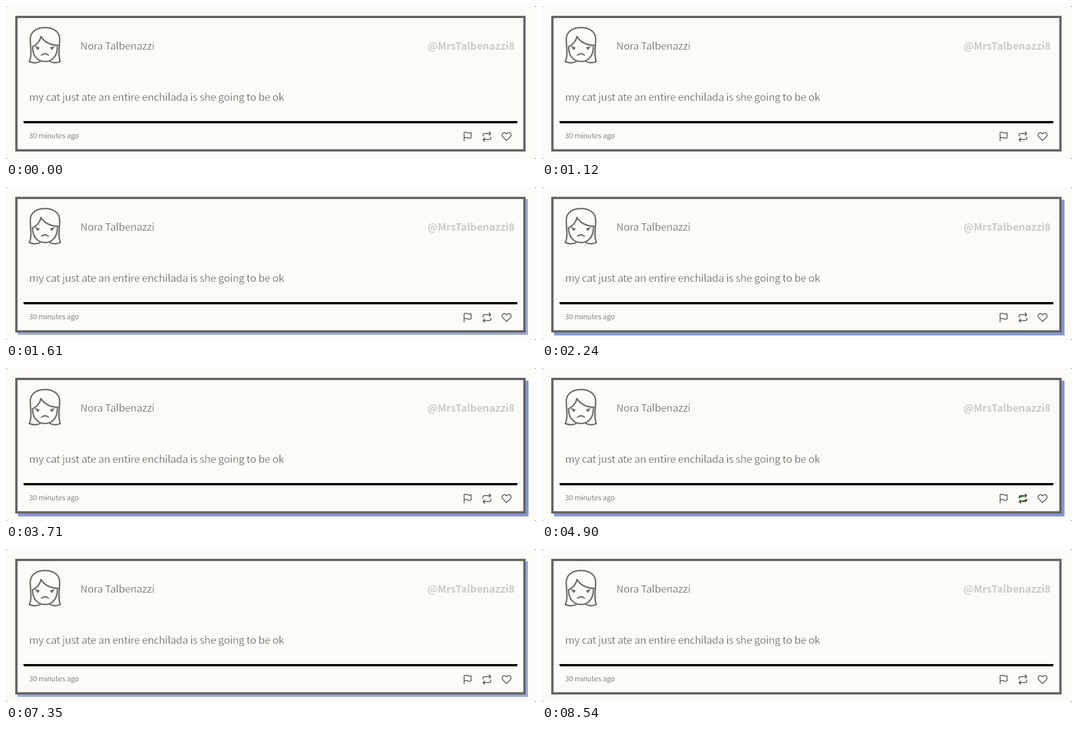
An HTML page for the animation above (8820 ms loop, 918 px wide and 266 px high).

```html
<!DOCTYPE html>
<html lang="en">
<head>
<meta charset="utf-8">
<title>Post card</title>
<style>
  :root { --paper: #fcfbf8; --ink: #666663; }
  html, body { margin: 0; width: 100%; height: 100%; overflow: hidden; background: #555; }
  svg { display: block; width: 918px; height: 266px; background: var(--paper); border-radius: 3px; }
  text {
    font: 400 17.9px "Noto Sans CJK JP", "Noto Sans CJK SC", "Noto Sans CJK", "Open Sans", sans-serif;
    letter-spacing: -.0145em;
    fill: #5f5f5d;
    /* a thin paper-coloured outline makes the strokes lighter */
    stroke: var(--paper);
    stroke-width: .4px;
  }
  .handle { font-size: 17.6px; font-weight: 700; letter-spacing: 0; fill: #cbcac8; stroke: none; }
  .time { font-size: 12.55px; stroke-width: .25px; }
  .line { fill: none; stroke-linecap: round; stroke-linejoin: round; }
  .avatar { stroke: #716d6a; stroke-width: 2.5; }
  .icon { stroke: #555553; stroke-width: 2; }
</style>
</head>
<body>
<svg viewBox="0 0 918 266">
  <rect id="shadow" x="16" y="17" width="884" height="236" fill="#8795d6"/>
  <rect x="18" y="19" width="880" height="232" fill="#fcfbf8" stroke="#666663" stroke-width="4"/>

  <g class="line avatar">
    <path d="M40.5 96.5C45.5 86 42 72 42 58C42 44.5 53 37.5 67.5 37.5S93 44.5 93 58C93 72 89.5 86 94 96.5"/>
    <path d="M40.5 96.5Q50 101 59 96.5M94 96.5Q85 101 76 96.5"/>
    <path d="M46 71C46 87 55 96.5 67.5 96.5S89 87 89 71"/>
    <path d="M46 71C53 67.500 59 61 60.500 53C66 62 76 68 91 68.500"/>
    <path d="M61.500 85.500Q67.500 80.500 73.500 85.500" stroke-width="2.200"/>
    <path d="M51.500 71L57 73M83 71L77.500 73" stroke-width="2"/>
    <g fill="#716d6a" stroke="none">
      <circle cx="55" cy="73.500" r="2.400"/>
      <circle cx="79.500" cy="73.500" r="2.400"/>
    </g>
  </g>

  <text x="128.500" y="76">Nora Talbenazzi</text>
  <text class="handle" x="881" y="76" text-anchor="end">@MrsTalbenazzi8</text>
  <text x="40" y="165">my cat just ate an entire enchilada is she going to be ok</text>
  <path d="M30 200H886L885 204H31Z"/>
  <text class="time" x="40" y="230">30 minutes ago</text>

  <g class="line icon">
    <path transform="translate(790.500 218) scale(.75)"
      d="M4 15s1-1 4-1 5 2 8 2 4-1 4-1V3s-1 1-4 1-5-2-8-2-4 1-4 1zM4 22V15"/>
    <path id="repeat" transform="translate(824 218) scale(.75)"
      d="M17 1l4 4-4 4M3 11V9a4 4 0 0 1 4-4h14M7 23l-4-4 4-4M21 13v2a4 4 0 0 1-4 4H3"/>
    <path id="heart" transform="translate(858 218) scale(.75)"
      d="M20.840 4.610a5.500 5.500 0 0 0-7.780 0L12 5.670l-1.060-1.060a5.500 5.500 0 0 0-7.780 7.780L12 21.230l8.840-8.840a5.500 5.500 0 0 0 0-7.780z"/>
  </g>
</svg>
<script>
  const LOOP = 8820, TICK = 70;
  const FADE = 200, ENTER = 1510, LEAVE = 7320, OFFSET = 5;
  const hovers = [
    { id: 'repeat', from: 4060, to: 5180, color: '#3f7a3c' },
    { id: 'heart', from: 5250, to: 7350, color: '#fa470a' }
  ];
  const el = id => document.getElementById(id);
  const clamp = v => Math.min(1, Math.max(0, v));
  const bezier = (a, b, u) => 3 * a * u * (1 - u) ** 2 + 3 * b * u * u * (1 - u) + u ** 3;

  // CSS "ease": solve x(u) = v by bisection, then read y(u)
  function ease(v) {
    if (v <= 0 || v >= 1) return clamp(v);
    let low = 0, high = 1;
    for (let i = 0; i < 20; i++) {
      const mid = (low + high) / 2;
      if (bezier(.25, .25, mid) < v) low = mid; else high = mid;
    }
    return bezier(.1, 1, low);
  }

  function draw(t) {
    const p = ease((t - ENTER) / FADE) - ease((t - LEAVE) / FADE);
    const d = OFFSET * p;
    el('shadow').setAttribute('transform', `translate(${d} ${d})`);
    el('shadow').setAttribute('opacity', p);
    for (const { id, from, to, color } of hovers)
      el(id).setAttribute('fill', t >= from && t < to ? color : 'none');
  }

  const start = performance.now();
  function frame() {
    const t = (performance.now() - start) % LOOP;
    draw(Math.floor((t + .5) / TICK) * TICK);
    requestAnimationFrame(frame);
  }
  frame();
</script>
</body>
</html>
```
